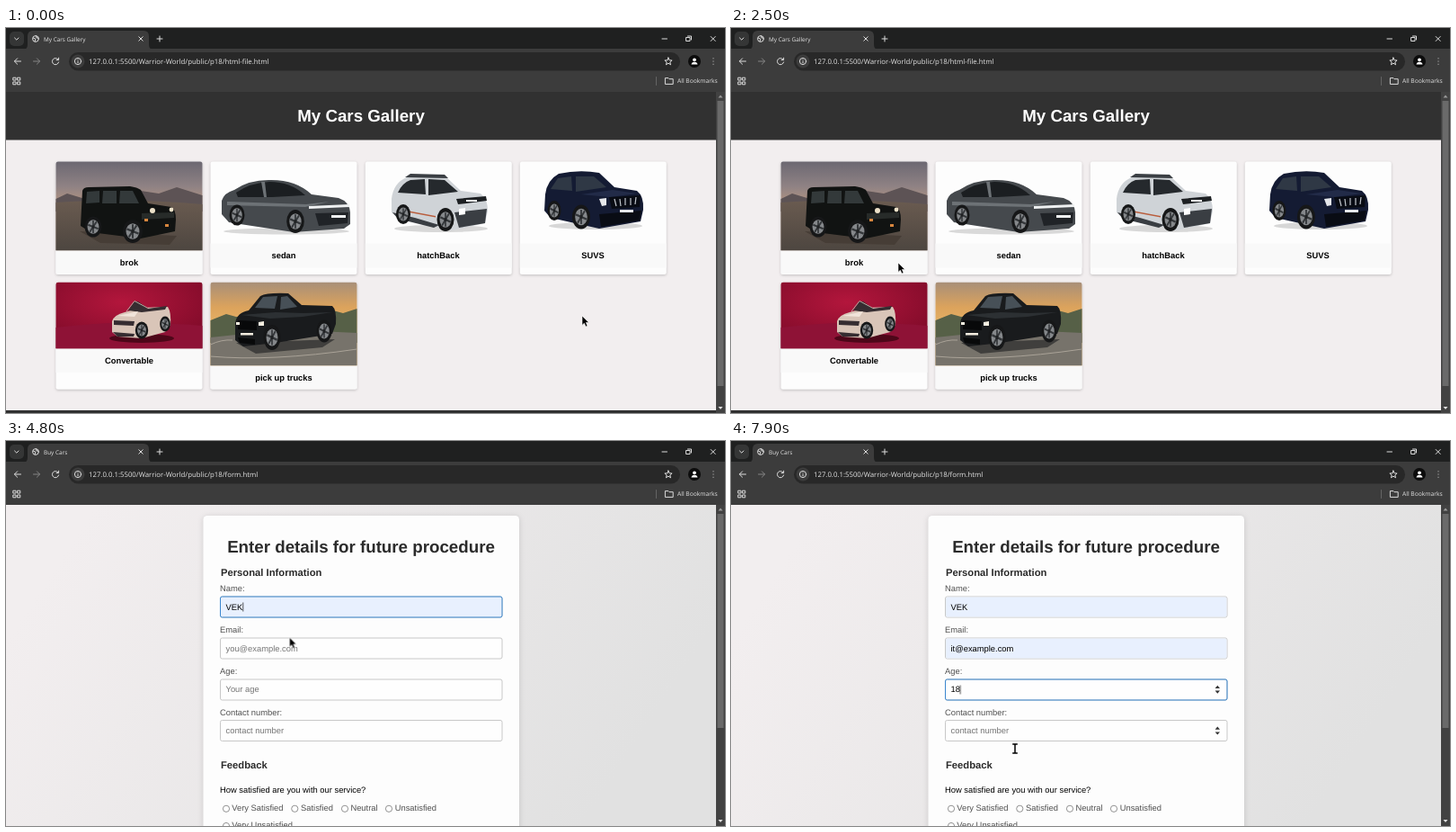
These frames come from a looping animation (800 px wide and 428 px high, 8000 ms). An HTML page:

```html
<!DOCTYPE html>
<html lang="en">
<head>
<meta charset="utf-8">
<title>My Cars Gallery</title>
<style>
html, body { margin: 0; width: 100%; height: 100%; overflow: hidden; background: #3c3c3c; }
svg { display: block; }
text { font: 9.37px "Liberation Sans", Arial, sans-serif; text-rendering: geometricPrecision; white-space: pre; }
.ui text { font-family: "Open Sans", "Noto Sans", sans-serif; fill: #e3e3e3; }
.ui .tab { font-size: 6.4px; }
.ui .url { font-size: 7.79px; }
.icon { fill: none; stroke: #dcdcdc; stroke-width: 1; stroke-linecap: round; stroke-linejoin: round; }
.h1 { font-size: 18.74px; font-weight: bold; text-anchor: middle; }
.h2 { font-size: 11.24px; font-weight: bold; fill: #2b2b2b; }
.caption text { font-weight: bold; text-anchor: middle; }
.caption rect { fill: #f9f9f9; }
.card { fill: #fdfdfd; filter: drop-shadow(0 1px 1.5px #0003); }
.label text { fill: #505050; }
.hint { fill: #757575; }
.field { fill: #fefefe; stroke: #c8c8c8; }
.filled { fill: #e8f0fe; }
.ring { fill: none; stroke: #3b87cf; }
.radio { fill: #fff; stroke: #767676; stroke-width: .8; }

/* Timeline: 8 s, 1.25% = 100 ms */
.t { animation: 8s step-end infinite; }
.move { animation: move 8s ease-in-out infinite; }
@keyframes gallery { 0% { opacity: 1 } 35% { opacity: 0 } }
@keyframes form { 0% { opacity: 0 } 35% { opacity: 1 } }
@keyframes nameFocus { 0% { opacity: 0 } 48.75% { opacity: 1 } 63.75% { opacity: 0 } }
@keyframes nameHint { 0% { opacity: 1 } 58.75% { opacity: 0 } }
@keyframes nameFill { 0% { opacity: 0 } 58.75% { opacity: 1 } }
@keyframes nameCaret { 0% { transform: none } 58.75% { transform: translateX(19.3px) } }
@keyframes mailFocus { 0% { opacity: 0 } 63.75% { opacity: 1 } 77.5% { opacity: 0 } }
@keyframes mailCaret { 0% { opacity: 1 } 68.75% { opacity: 0 } }
@keyframes mailHint { 0% { opacity: 1 } 68.75% { opacity: 0 } }
@keyframes mailFill { 0% { opacity: 0 } 68.75% { opacity: 1 } }
@keyframes mailPreview { 0% { opacity: 0 } 68.75% { opacity: 1 } 72.5% { opacity: 0 } }
@keyframes mailValue { 0% { opacity: 0 } 72.5% { opacity: 1 } }
@keyframes ageFocus { 0% { opacity: 0 } 77.5% { opacity: 1 } }
@keyframes ageHint { 0% { opacity: 1 } 86.25% { opacity: 0 } }
@keyframes digit1 { 0% { opacity: 0 } 86.25% { opacity: 1 } }
@keyframes digit2 { 0% { opacity: 0 } 88.75% { opacity: 1 } }
@keyframes ageCaret { 0% { transform: none } 86.25% { transform: translateX(5.2px) } 88.75% { transform: translateX(10.5px) } }
@keyframes phoneHover { 0% { opacity: 0 } 95% { opacity: 1 } }
@keyframes arrow {
  0% { opacity: 1 } 44.375% { opacity: 0 } 53.75% { opacity: 1 }
  61.875% { opacity: 0 } 66.875% { opacity: 1 } 74.375% { opacity: 0 }
}
@keyframes beam {
  0% { opacity: 0 } 44.375% { opacity: 1 } 53.75% { opacity: 0 }
  61.875% { opacity: 1 } 66.875% { opacity: 0 } 74.375% { opacity: 1 }
}
@keyframes move {
  0%, 1.25% { transform: translate(641px, 320px) }
  8.75%, 18.75% { transform: translate(188.5px, 260px) }
  21.25%, 33.75% { transform: translate(186px, 261px) }
  37.5%, 40% { transform: translate(177.5px, 234px) }
  46.25%, 52.5% { transform: translate(300px, 186px) }
  57.5%, 61.25% { transform: translate(315.5px, 218.5px) }
  63.75%, 66.25% { transform: translate(316px, 232px) }
  69.375%, 72.5% { transform: translate(324px, 258px) }
  76.875%, 91.25% { transform: translate(318px, 277px) }
  97.5%, 100% { transform: translate(316px, 342px) }
}
</style>
</head>
<body>
<svg width="800" height="428" viewBox="0 0 800 428">
<defs>
  <linearGradient id="dusk" x2="0" y2="1">
    <stop stop-color="#6c6872"/><stop offset=".28" stop-color="#8f8284"/><stop offset=".4" stop-color="#a58d82"/>
  </linearGradient>
  <linearGradient id="dirt" x2="0" y2="1"><stop stop-color="#6a5b50"/><stop offset="1" stop-color="#4d4640"/></linearGradient>
  <radialGradient id="red" cx=".45" cy=".3" r=".75"><stop stop-color="#b3163c"/><stop offset="1" stop-color="#7c0a28"/></radialGradient>
  <linearGradient id="sunset" x2="0" y2="1">
    <stop stop-color="#a88f78"/><stop offset=".3" stop-color="#dca35c"/><stop offset=".55" stop-color="#e8b468"/>
  </linearGradient>
  <linearGradient id="paper" gradientUnits="userSpaceOnUse" x1="100" y1="71" x2="640" y2="428">
    <stop stop-color="#f2eeef"/><stop offset="1" stop-color="#e1e1e1"/>
  </linearGradient>
  <g id="wheel">
    <circle r="10" fill="#161718"/><circle r="6.8" fill="#85888b"/>
    <path d="M0-6V6M-6-2 6 2M-4 5 4-5" stroke="#34373a" stroke-width="1.8"/><circle r="1.6" fill="#202224"/>
  </g>
  <g id="spin" fill="#333"><path d="M538.6 275 541.3 271.8 544 275ZM538.6 277.6H544L541.3 280.8Z"/></g>
</defs>

<!-- Browser frame -->
<g class="ui">
  <path fill="#1f2020" d="M0 0H800V24H0Z"/>
  <path fill="#3c3c3c" d="M0 23H800V71H0Z"/>
  <rect x="4" y="4" width="16" height="16" rx="5" fill="#353636"/>
  <path fill="#3c3c3c" d="M19 24Q24 24 24 18V9Q24 3 30 3H153Q159 3 159 9V18Q159 24 164 24Z"/>
  <rect x="70" y="27" width="680" height="20.5" rx="10.2" fill="#282828"/>
  <g class="icon">
    <path d="M9.6 11 11.8 13.2 14 11M147.8 9.8 152.2 14.2M152.2 9.8 147.8 14.2M168 12H174M171 9V15"/>
    <path d="M730 12H735.5M784.2 9.5 789.2 14.5M789.2 9.5 784.2 14.5M757 10.5H761V14.5H757ZM758.5 9H762.5V13"/>
    <path d="M16.5 37H9.5M12.6 33.8 9.4 37 12.6 40.2"/>
    <path stroke="#858585" d="M30.5 37H37.5M34.4 33.8 37.6 37 34.4 40.2"/>
    <path d="M58 35A3.6 3.6 0 1 0 58.6 38M58.6 33.2V35.6H56.2"/>
    <circle cx="33" cy="12" r="3.4"/>
    <path d="M30.2 11 33 12.2 32 14.8M33.6 8.8 34 11H36"/>
    <path d="M737 33 738.2 35.8 741.1 36 738.8 37.9 739.6 40.8 737 39.2 734.4 40.8 735.2 37.9 732.9 36 735.8 35.8Z"/>
    <path d="M8.2 55.2H11V58H8.2ZM13 55.2H15.8V58H13ZM8.2 60H11V62.8H8.2ZM13 60H15.8V62.8H13Z"/>
    <path d="M733.8 55.6H737L738 56.7H742.2V62.4H733.8Z"/>
    <path stroke="#646464" d="M723.5 54.5V63.5"/>
  </g>
  <circle cx="80" cy="37" r="7.5" fill="#3c3c3c"/>
  <circle cx="80" cy="37" r="3.6" class="icon"/>
  <path class="icon" d="M80 37V38.8M80 35.2V35.3"/>
  <circle cx="766" cy="37" r="7" fill="#0c0c0c"/>
  <circle cx="766" cy="35.3" r="1.9" fill="#fff"/><path d="M762.5 40.6Q763 37.8 766 37.8T769.5 40.6Z" fill="#fff"/>
  <path class="icon" stroke-width="1.4" d="M787 33.8V33.9M787 37V37.1M787 40.2V40.3"/>
  <text class="tab" x="747" y="61.2" style="font-size:6.7px">All Bookmarks</text>
</g>

<!-- Form page -->
<g class="t" style="animation-name:form">
  <g class="ui"><text class="tab" x="42" y="14.6">Buy Cars</text>
    <text class="url" x="92" y="40">127.0.0.1:5500/Warrior-World/public/p18/form.html</text></g>
  <path fill="url(#paper)" d="M0 71H790V428H0Z"/>
  <rect class="card" x="219.5" y="83" width="351.5" height="380" rx="4.5" style="filter:drop-shadow(0 1px 3px #0002)"/>
  <text class="h1" x="395" y="124" fill="#2b2b2b">Enter details for future procedure</text>
  <text class="h2" x="239" y="150.3">Personal Information</text>
  <text class="h2" x="239" y="364.3">Feedback</text>
  <g class="label">
    <text x="238" y="167.3">Name:</text><text x="238" y="213.2">Email:</text>
    <text x="238" y="259.1">Age:</text><text x="238" y="305">Contact number:</text>
    <text x="251.3" y="411">Very Satisfied</text><text x="328" y="411">Satisfied</text>
    <text x="383.4" y="411">Neutral</text><text x="432.7" y="411">Unsatisfied</text>
    <text x="251.3" y="430.3">Very Unsatisfied</text>
  </g>
  <text x="238" y="390.8">How satisfied are you with our service?</text>
  <g class="radio">
    <circle cx="245" cy="408.8" r="3.6"/><circle cx="321.3" cy="408.8" r="3.6"/>
    <circle cx="377" cy="408.8" r="3.6"/><circle cx="426" cy="408.8" r="3.6"/><circle cx="245" cy="428" r="3.6"/>
  </g>
  <g class="field">
    <rect x="238.5" y="173" width="313.5" height="23" rx="2"/><rect x="238.5" y="219" width="313.5" height="23" rx="2"/>
    <rect x="238.5" y="265" width="313.5" height="23" rx="2"/><rect x="238.5" y="310.5" width="313.5" height="23" rx="2"/>
  </g>

  <g class="t" style="animation-name:nameFill">
    <rect class="filled" x="239" y="173.5" width="312.5" height="22" rx="1.5"/><text x="244.5" y="187.7">VEK</text>
  </g>
  <text class="hint t" style="animation-name:nameHint" x="244.5" y="187.7">Your full name</text>
  <g class="t" style="animation-name:nameFocus">
    <rect class="ring" x="238.5" y="173" width="313.5" height="23" rx="2"/>
    <path class="t" style="animation-name:nameCaret" stroke="#111" stroke-width=".7" d="M244.5 179.5V189.5"/>
  </g>

  <rect class="filled t" style="animation-name:mailFill" x="239" y="219.5" width="312.5" height="22" rx="1.5"/>
  <text class="hint t" style="animation-name:mailHint" x="244.5" y="233.5">you@example.com</text>
  <g class="t" style="animation-name:mailPreview"><text x="244.5" y="233.3" style="font-size:7.8px">it@example.com</text></g>
  <text class="t" style="animation-name:mailValue" x="244.5" y="233.5">it@example.com</text>
  <g class="t" style="animation-name:mailFocus">
    <rect class="ring" x="238.5" y="219" width="313.5" height="23" rx="2"/>
    <path class="t" style="animation-name:mailCaret" stroke="#111" stroke-width=".7" d="M244.5 225.5V235.5"/>
  </g>

  <text class="hint t" style="animation-name:ageHint" x="244.5" y="279.4">Your age</text>
  <text class="t" style="animation-name:digit1" x="244.5" y="279.4">1</text>
  <text class="t" style="animation-name:digit2" x="249.7" y="279.4">8</text>
  <g class="t" style="animation-name:ageFocus">
    <rect class="ring" x="238.5" y="265" width="313.5" height="23" rx="2"/><use href="#spin"/>
    <path class="t" style="animation-name:ageCaret" stroke="#111" stroke-width=".7" d="M244.7 271.5V281.5"/>
  </g>

  <text class="hint" x="244.5" y="325.2">contact number</text>
  <g class="t" style="animation-name:phoneHover"><use href="#spin" y="45.8"/></g>
</g>

<!-- Gallery page -->
<g class="t" style="animation-name:gallery">
  <g class="ui"><text class="tab" x="42" y="14.6">My Cars Gallery</text>
    <text class="url" x="92" y="40">127.0.0.1:5500/Warrior-World/public/p18/html-file.html</text></g>
  <path fill="#f2eeef" d="M0 71H790V428H0Z"/>
  <path fill="#313131" d="M0 71H790V124.5H0ZM0 425H790V428H0Z"/>
  <text class="h1" x="395" y="104" fill="#fff">My Cars Gallery</text>
  <g class="card">
    <rect x="55.5" y="148.5" width="163" height="125.5" rx="2.5"/><rect x="227.5" y="148.5" width="163" height="125.5" rx="2.5"/>
    <rect x="399.8" y="148.5" width="163" height="125.5" rx="2.5"/><rect x="571.8" y="148.5" width="163" height="125.5" rx="2.5"/>
    <rect x="55.5" y="282.8" width="163" height="119" rx="2.5"/><rect x="227.5" y="282.8" width="163" height="119" rx="2.5"/>
  </g>
  <g class="caption">
    <rect x="55.5" y="247" width="163" height="26.5"/><rect x="227.5" y="239.5" width="163" height="27"/>
    <rect x="399.8" y="239.5" width="163" height="27"/><rect x="571.8" y="239.5" width="163" height="27"/>
    <rect x="55.5" y="356" width="163" height="27"/><rect x="227.5" y="375" width="163" height="26"/>
    <text x="137" y="264.2">brok</text><text x="309" y="256.3">sedan</text><text x="481" y="255.8">hatchBack</text>
    <text x="653" y="256.3">SUVS</text><text x="137" y="372.9">Convertable</text><text x="309" y="391.5">pick up trucks</text>
  </g>

  <!-- Boxy off-roader at dusk -->
  <path fill="url(#dusk)" d="M55.5 247.3V151Q55.5 148.5 58 148.5H216Q218.5 148.5 218.5 151V247.3Z"/>
  <path fill="#5d5355" d="M55.5 190 68 184 88 190 150 181 170 184 190 177 218.5 186V204H55.5Z"/>
  <path fill="url(#dirt)" d="M55.5 194Q130 188 218.5 196V247.3H55.5Z"/>
  <path fill="#463d36" d="M82 226 190 231 182 241 105 239Z"/>
  <path fill="#111312" d="M85 181Q86 177 92 177L138 176Q146 177 150 180L158 195 184 199Q189 202 189 213L188 226 150 234 94 227 83 220Z"/>
  <path fill="#33393a" d="M90 182 104 181V194L89 195ZM108 181 123 181V195L107 195ZM127 181 141 181 148 195 126 195Z"/>
  <path fill="#272b29" d="M151 206 187 205 187 211 151 213Z"/>
  <use href="#wheel" transform="translate(97 221) scale(.95 1.15)"/><use href="#wheel" transform="translate(141 226) scale(1.1 1.3)"/>
  <circle cx="163" cy="203" r="3" fill="#ece1c8"/><circle cx="184" cy="202" r="2.4" fill="#ece1c8"/>
  <path fill="#d7863e" d="M154 212H158V215H154ZM177 218H181V221H177Z"/>

  <!-- Sedan -->
  <ellipse cx="312" cy="226" rx="70" ry="3.5" fill="#d9d9d9"/>
  <path fill="#45494d" d="M240 192Q243 183 254 180 270 169 292 169 322 168 340 185L370 189Q382 193 383 205V218L376 223 320 227 248 216 240 207Z"/>
  <path fill="#1b1e21" d="M256 183Q272 172 293 171 317 171 333 186L296 188 258 188Z"/>
  <path fill="#6d7276" d="M284 171 287 188 290 188 288 171ZM246 193 334 196 360 193 333 199 246 197Z"/>
  <path fill="#202327" d="M344 206 381 205 380 217 348 220Z"/><path fill="#eef0f1" d="M337 198 382 196V199L337 201ZM362 208H378V211H362Z"/>
  <use href="#wheel" transform="translate(257 208) scale(.85 1.15)"/><use href="#wheel" transform="translate(322 215) scale(.98 1.3)"/>

  <!-- Hatchback -->
  <ellipse cx="484" cy="223" rx="52" ry="4" fill="#d8d8d8"/>
  <path fill="#cfd3d7" d="M429 190Q431 172 446 166 466 161 490 166L506 181 528 184Q536 190 536 203L533 217 496 225 437 212 429 205Z"/>
  <path fill="#25292d" d="M436 183Q441 172 450 169L466 168 467 185ZM470 168 488 169 503 182 470 186Z"/>
  <path fill="#3a3e43" d="M444 166 450 162 488 163 492 167ZM430 205 455 211 482 219 476 222 436 212ZM499 205 535 201 533 217 504 222Z"/>
  <path fill="#1d2023" d="M501 190 534 187 535 192 503 196Z"/><path fill="#fff" d="M504 201 511 200 511 207 504 208ZM512 191H524V193H512Z"/>
  <path fill="#b95d3c" d="M446 203 478 209V210.5L446 204.5Z"/>
  <use href="#wheel" transform="translate(442 207) scale(.8 1.1)"/><use href="#wheel" transform="translate(489 213) scale(.95 1.3)"/>

  <!-- SUV -->
  <ellipse cx="656" cy="220" rx="52" ry="4" fill="#d7d7d7"/>
  <path fill="#141b33" d="M600 185Q602 169 615 162 638 157 660 161L677 177 702 181Q710 187 709 202L706 215 660 223 606 211 599 203Z"/>
  <path fill="#2f3845" d="M606 179 614 167 629 165 630 181ZM634 165 654 165 668 177 634 182Z"/>
  <path fill="#222b48" d="M640 185 675 180 702 184 672 188Z"/>
  <path fill="#090c14" d="M671 188 706 186 705 199 674 201ZM660 207 707 203 705 214 662 221Z"/>
  <path stroke="#c0c5cb" stroke-width="1.2" d="M677 190 679 198M683 190 684 198M689 189V197M695 189V197M701 188 700 196"/>
  <path fill="#e5e7ea" d="M660 190 668 189V197L663 198ZM683 202H698V205H683Z"/>
  <use href="#wheel" transform="translate(610 203) scale(.75 1.1)"/><use href="#wheel" transform="translate(640 210) scale(1 1.35)"/>

  <!-- Convertible -->
  <path fill="url(#red)" d="M55.5 356.3V285Q55.5 282.8 58 282.8H216Q218.5 282.8 218.5 285V356.3Z"/>
  <path fill="#8e1236" d="M55.5 333Q130 323 218.5 331V356.3H55.5Z"/>
  <ellipse cx="151" cy="345" rx="36" ry="5" fill="#4d0719"/>
  <path fill="#d9c5b8" d="M118 326Q120 319 132 316L149 311 180 310Q184 316 183 330L177 338 151 345 124 343 118 338Z"/>
  <path fill="#362d31" d="M136 314 143 304 147 304 158 312 179 309 177 313 151 316ZM120 325 143 326 142 331 120 330ZM119 338 143 340 142 343 124 343Z"/>
  <path fill="#f1e4da" d="M124 320 147 315 143 321Z"/>
  <path fill="none" stroke="#b7a89f" d="M134 315 143 303.5 157 311"/>
  <use href="#wheel" transform="translate(151 336) scale(.72 .95)"/><use href="#wheel" transform="translate(177 329) scale(.58 .85)"/>

  <!-- Pickup at sunset -->
  <path fill="url(#sunset)" d="M227.5 375.3V285Q227.5 282.8 230 282.8H388Q390.5 282.8 390.5 285V375.3Z"/>
  <path fill="#566047" d="M227.5 325 245 318 256 321 360 313 375 317 390.5 312V350H227.5Z"/>
  <path fill="#77736b" d="M227.5 344Q310 334 390.5 339V375.3H227.5Z"/>
  <path fill="none" stroke="#aaa398" d="M227.5 365Q295 371 390.5 357M227.5 352Q240 346 252 347"/>
  <path fill="#403f3d" d="M256 350 366 346 352 355 278 362Z"/>
  <path fill="#191b1d" d="M255 328Q257 316 270 314L283 298Q290 294 314 295L329 308 363 309Q368 313 367 329L363 340 300 350 264 354 255 347Z"/>
  <path fill="#475057" d="M277 311 286 299 302 298 299 312ZM306 299 313 298 324 310 305 313Z"/>
  <path fill="#2c3033" d="M262 319 300 316 331 317 363 316 330 321 294 323Z"/>
  <path fill="#08090a" d="M258 325 279 326 279 336 258 335ZM258 344 277 346 277 352 260 350Z"/>
  <path fill="#f4eee0" d="M256 327H260V330H256ZM281 327 287 326V331H281ZM261 339H275V341.5H261Z"/>
  <use href="#wheel" transform="translate(296 344) scale(.95 1.4)"/><use href="#wheel" transform="translate(354 337) scale(.85 1.25)"/>
</g>

<!-- Scrollbar -->
<path fill="#424242" d="M790 71H800V428H790Z"/>
<rect class="t" style="animation-name:gallery" x="791.5" y="81" width="7" height="317" fill="#6a6a6a"/>
<rect class="t" style="animation-name:form" x="791.5" y="81" width="7" height="238" fill="#6a6a6a"/>
<path fill="#9a9a9a" d="M792.5 77.5 795 74.5 797.5 77.5Z"/><path fill="#e0e0e0" d="M792.5 421 795 424 797.5 421Z"/>

<!-- Pointer -->
<g class="move">
  <path class="t" style="animation-name:arrow" fill="#000" stroke="#fff" stroke-width=".6" d="M0 0V10.4L2.4 8.2 4.1 12 6 11.2 4.4 7.5H7.6Z"/>
  <path class="t" style="animation-name:beam" fill="none" stroke="#000" stroke-width="1.5" d="M-2.8-5H2.8M0-5V5M-2.8 5H2.8"/>
</g>
</svg>
</body>
</html>
```
